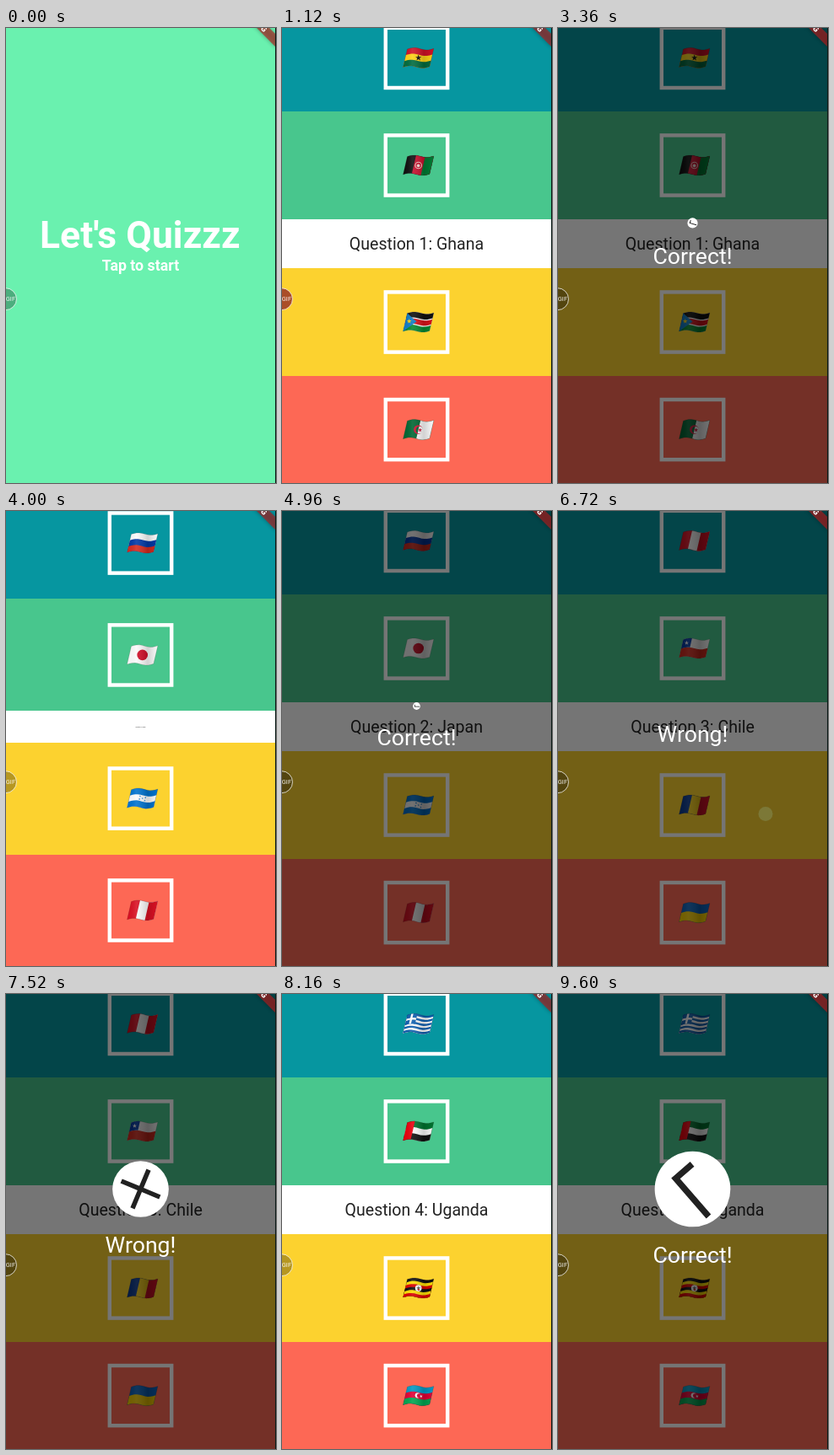
Animation, 320 px wide and 540 px high, one loop 9760 ms. Source, as an HTML page with a canvas:

```html
<!DOCTYPE html>
<html lang="en">
<head>
<meta charset="utf-8">
<title>Flag quiz</title>
<style>
  html, body { margin: 0; width: 100%; height: 100%; overflow: hidden; background: #000; }
  canvas { display: block; width: 320px; height: 540px; }
</style>
</head>
<body>
<canvas id="stage"></canvas>
<script>
const W = 320, H = 540, LOOP = 9760, STEP = 160;
const CX = 159.5, CY = 256, HALF = 284.4, DP = 320 / 360;
const TILES = ['#0696a0', '#48c68d', '#fcd22f', '#fd6855'];

const canvas = document.getElementById('stage');
const dpr = window.devicePixelRatio || 1;
canvas.width = W * dpr;
canvas.height = H * dpr;
const c = canvas.getContext('2d');

// born: question appears, tap: answer overlay opens
const ROUNDS = [
  { name: 'Ghana', flags: ['ghana', 'afghanistan', 'southSudan', 'algeria'], born: 560, tap: 3320, right: true },
  { name: 'Japan', flags: ['russia', 'japan', 'honduras', 'peru'], born: 3950, tap: 4930, right: true },
  { name: 'Chile', flags: ['peru', 'chile', 'romania', 'ukraine'], born: 5518, tap: 6718, right: false },
  { name: 'Uganda', flags: ['greece', 'uae', 'uganda', 'azerbaijan'], born: 7600, tap: 9215, right: true }
];

const clamp = x => Math.min(1, Math.max(0, x));

function bounceOut(t) {
  const k = 7.5625;
  if (t < 1 / 2.75) return k * t * t;
  if (t < 2 / 2.75) return k * (t - 1.5 / 2.75) ** 2 + 0.75;
  if (t < 2.5 / 2.75) return k * (t - 2.25 / 2.75) ** 2 + 0.9375;
  return k * (t - 2.625 / 2.75) ** 2 + 0.984375;
}

function elasticOut(t) {
  if (t <= 0 || t >= 1) return clamp(t);
  return 2 ** (-10 * t) * Math.sin((t - 0.1) * 5 * Math.PI) + 1;
}

function rect(x, y, w, h, fill) {
  c.fillStyle = fill;
  c.fillRect(x, y, w, h);
}

function disc(x, y, r, fill) {
  c.beginPath();
  c.arc(x, y, r, 0, 7);
  c.fillStyle = fill;
  c.fill();
}

function text(str, x, y, size, fill, weight = 400) {
  c.font = `${weight} ${size}px Roboto, sans-serif`;
  c.textAlign = 'center';
  c.fillStyle = fill;
  c.fillText(str, x, y + size * 0.342);
}

// Point on the waving cloth, u across and v down, both 0..1
const cloth = (u, v) => [
  31.4 * u + 5 * (1 - v) - 18,
  21.5 * (v - 0.5) - 1.5 * Math.sin(u * 2 * Math.PI) - u * 0.6 + 0.3
];

function patch(u0, v0, u1, v1) {
  c.beginPath();
  for (let i = 0; i <= 10; i++) c.lineTo(...cloth(u0 + (u1 - u0) * i / 10, v0));
  for (let i = 10; i >= 0; i--) c.lineTo(...cloth(u0 + (u1 - u0) * i / 10, v1));
  c.closePath();
}

function area(u0, v0, u1, v1, fill) {
  patch(u0, v0, u1, v1);
  c.fillStyle = fill;
  c.fill();
}

const rows = (cols, u0 = 0, v0 = 0, u1 = 1, v1 = 1) => cols.forEach((col, i) =>
  area(u0, v0 + (v1 - v0) * i / cols.length, u1, v1, col));
const columns = cols => cols.forEach((col, i) => area(i / cols.length, 0, 1, 1, col));
const spot = (u, v, r, fill) => disc(...cloth(u, v), r, fill);

function star(u, v, r, fill) {
  const [x, y] = cloth(u, v);
  c.beginPath();
  for (let i = 0; i < 10; i++) {
    const a = i * Math.PI / 5 - Math.PI / 2, d = i % 2 ? r * 0.4 : r;
    c.lineTo(x + d * Math.cos(a), y + d * Math.sin(a));
  }
  c.fillStyle = fill;
  c.fill();
}

function crescent(u, v, r, fill, back) {
  spot(u, v, r, fill);
  spot(u + 0.05, v, r * 0.78, back);
}

const RED = '#ce1126', WHITE = '#fafafa', GREEN = '#007a33', BLACK = '#101010', YELLOW = '#fcd116';

const FLAGS = {
  ghana() { rows([RED, YELLOW, '#006b3f']); star(0.5, 0.5, 3.8, BLACK); },
  afghanistan() {
    columns([BLACK, '#c8102e', GREEN]);
    spot(0.5, 0.5, 4.3, '#f0c4bd');
    spot(0.5, 0.5, 3.2, '#c8102e');
    spot(0.5, 0.52, 1.8, '#f4dcd6');
  },
  southSudan() {
    area(0, 0, 1, 1, WHITE);
    area(0, 0, 1, 0.3, BLACK);
    area(0, 0.36, 1, 0.64, '#da121a');
    area(0, 0.7, 1, 1, '#078930');
    c.beginPath();
    [[0, 0], [0.43, 0.5], [0, 1]].forEach(p => c.lineTo(...cloth(...p)));
    c.fillStyle = '#0f7bc4';
    c.fill();
    star(0.15, 0.5, 3, YELLOW);
  },
  algeria() {
    columns(['#006633', WHITE]);
    spot(0.49, 0.5, 5.3, '#d21034');
    c.save();
    patch(0, 0, 0.5, 1);
    c.clip();
    spot(0.54, 0.5, 4.3, '#006633');
    c.restore();
    c.save();
    patch(0.5, 0, 1, 1);
    c.clip();
    spot(0.54, 0.5, 4.3, WHITE);
    c.restore();
    star(0.56, 0.5, 2.5, '#d21034');
  },
  russia() { rows([WHITE, '#0039a6', '#d52b1e']); },
  japan() { area(0, 0, 1, 1, WHITE); spot(0.5, 0.5, 6.3, '#d00c27'); },
  honduras() {
    rows(['#0073cf', WHITE, '#0073cf']);
    [[0.5, 0.5], [0.4, 0.42], [0.6, 0.42], [0.4, 0.58], [0.6, 0.58]]
      .forEach(([u, v]) => star(u, v, 1.2, '#0073cf'));
  },
  peru() { columns(['#d91023', WHITE, '#d91023']); },
  chile() {
    rows([WHITE, '#d52b1e']);
    area(0, 0, 0.33, 0.5, '#0039a6');
    star(0.165, 0.25, 2.7, WHITE);
  },
  romania() { columns(['#0b3c94', YELLOW, RED]); },
  ukraine() { rows(['#0b66c3', '#ffd500']); },
  greece() {
    const blue = '#0d5eaf';
    rows([0, 1, 2, 3, 4, 5, 6, 7, 8].map(i => i % 2 ? WHITE : blue));
    area(0, 0, 0.38, 5 / 9, blue);
    area(0, 2 / 9, 0.38, 3 / 9, WHITE);
    area(0.15, 0, 0.23, 5 / 9, WHITE);
  },
  uae() { rows(['#00732f', WHITE, BLACK]); area(0, 0, 0.29, 1, '#e8000d'); },
  uganda() {
    rows([BLACK, '#fcdc04', '#d90000', BLACK, '#fcdc04', '#d90000']);
    spot(0.5, 0.5, 3.9, WHITE);
    star(0.5, 0.5, 2.6, '#555');
    spot(0.52, 0.58, 1, '#d90000');
  },
  azerbaijan() {
    rows(['#0098c3', '#e00034', '#00a651']);
    crescent(0.47, 0.5, 3.1, WHITE, '#e00034');
    star(0.6, 0.5, 1.9, WHITE);
  }
};

function flag(name, y) {
  c.save();
  c.translate(161.5, y);
  FLAGS[name]();
  const shade = c.createLinearGradient(-18, 0, 18, 0);
  shade.addColorStop(0, 'rgba(0,0,0,0)');
  shade.addColorStop(0.3, 'rgba(255,255,255,.1)');
  shade.addColorStop(0.68, 'rgba(0,0,0,.16)');
  shade.addColorStop(1, 'rgba(0,0,0,0)');
  area(0, 0, 1, 1, shade);
  patch(0, 0, 1, 1);
  c.strokeStyle = 'rgba(40,30,30,.25)';
  c.lineWidth = 0.6;
  c.stroke();
  c.restore();
}

function quiz(round, n, t) {
  const size = 22 * DP * bounceOut(clamp((t - round.born) / 500));
  const bar = 20 * DP + size * 0.586;
  const tile = (HALF - bar) / 2;
  const tops = [CY - HALF, CY - bar - tile, CY + bar, CY + bar + tile];
  rect(0, CY - HALF, W, 2 * HALF, '#fff');
  tops.forEach((top, i) => {
    const y0 = Math.round(top), y1 = Math.round(top + tile), mid = top + tile / 2;
    rect(0, y0, W, y1 - y0, TILES[i]);
    c.strokeStyle = '#fff';
    c.lineWidth = 5 * DP;
    c.strokeRect(CX - 36.7, mid - 35.6, 73.4, 71.2);
    flag(round.flags[i], mid);
  });
  if (size > 0.2) text(`Question ${n}: ${round.name}`, CX, CY, size, '#222');
}

const ICONS = {
  done: new Path2D('M9 16.2L4.8 12l-1.4 1.4L9 19 21 7l-1.4-1.4L9 16.2z'),
  clear: new Path2D('M19 6.41L17.59 5 12 10.59 6.41 5 5 6.41 10.59 12 5 17.59 6.41 19 12 13.41 17.59 19 19 17.59 13.41 12z')
};

function overlay(round, t) {
  const v = elasticOut((t - round.tap) / 2000);
  const d = Math.max(0, 80 * DP * v), size = 30 * DP;
  const gap = 20 * DP, line = size * 1.172;
  const top = CY - (d + gap + line) / 2;
  rect(0, 0, W, H, 'rgba(0,0,0,.54)');
  if (d > 1) {
    c.save();
    c.translate(CX, top + d / 2);
    disc(0, 0, d / 2, '#fff');
    c.rotate(v * 2 * Math.PI);
    c.scale(d / 24, d / 24);
    c.translate(-12, -12);
    c.fillStyle = '#212121';
    c.fill(round.right ? ICONS.done : ICONS.clear);
    c.restore();
  }
  text(round.right ? 'Correct!' : 'Wrong!', CX, top + d + gap + line / 2, size, '#fff');
}

function landing(t) {
  rect(0, 0, W, H, '#6af1af');
  text("Let's Quizzz", 158.8, 245.6, 50 * DP, '#fff', 700);
  text('Tap to start', CX, 282.4, 20 * DP, '#fff', 700);
  if (t >= 480) rect(0, 0, W, H, 'rgba(188,188,188,.3)');
}

function ribbon() {
  c.save();
  c.translate(319, CY - HALF);
  c.rotate(Math.PI / 4);
  c.scale(DP, DP);
  c.shadowColor = 'rgba(0,0,0,.5)';
  c.shadowBlur = 6 * DP * dpr;
  rect(-40, 28, 80, 12, 'rgba(183,28,28,.63)');
  c.shadowColor = 'transparent';
  text('DEBUG', 0, 34, 10.2, '#fff', 900);
  c.restore();
}

function bubble(fill) {
  disc(-0.5, 321.7, 13, fill);
  c.strokeStyle = 'rgba(255,255,255,.75)';
  c.lineWidth = 1;
  c.stroke();
  text('GIF', 5.4, 321.9, 7.5, 'rgba(255,255,255,.9)');
}

function draw(t) {
  c.setTransform(dpr, 0, 0, dpr, 0, 0);
  let n = 0;
  while (n < ROUNDS.length && t >= ROUNDS[n].born) n++;
  const round = ROUNDS[n - 1];
  const enter = clamp((t - ROUNDS[0].born) / 300);
  if (enter < 1) landing(t);
  if (round) {
    c.save();
    c.globalAlpha = enter ** 1.8;
    c.translate(0, HALF / 2 * (1 - enter) ** 3);
    quiz(round, n, t);
    c.restore();
    if (t >= round.tap) overlay(round, t);
  }
  if (t >= 6720 && t < 6880) disc(246, 359.5, 8.5, 'rgba(150,190,160,.25)');
  ribbon();
  bubble(n === 1 && enter === 1 && t < round.tap ? '#aa4e28' : 'rgba(0,0,0,.28)');
  rect(319, 0, 1, H, '#0a1a16');
}

const start = performance.now();
function tick() {
  const t = (performance.now() - start) % LOOP;
  draw(Math.floor(t / STEP) * STEP);
  requestAnimationFrame(tick);
}
tick();
</script>
</body>
</html>
```
